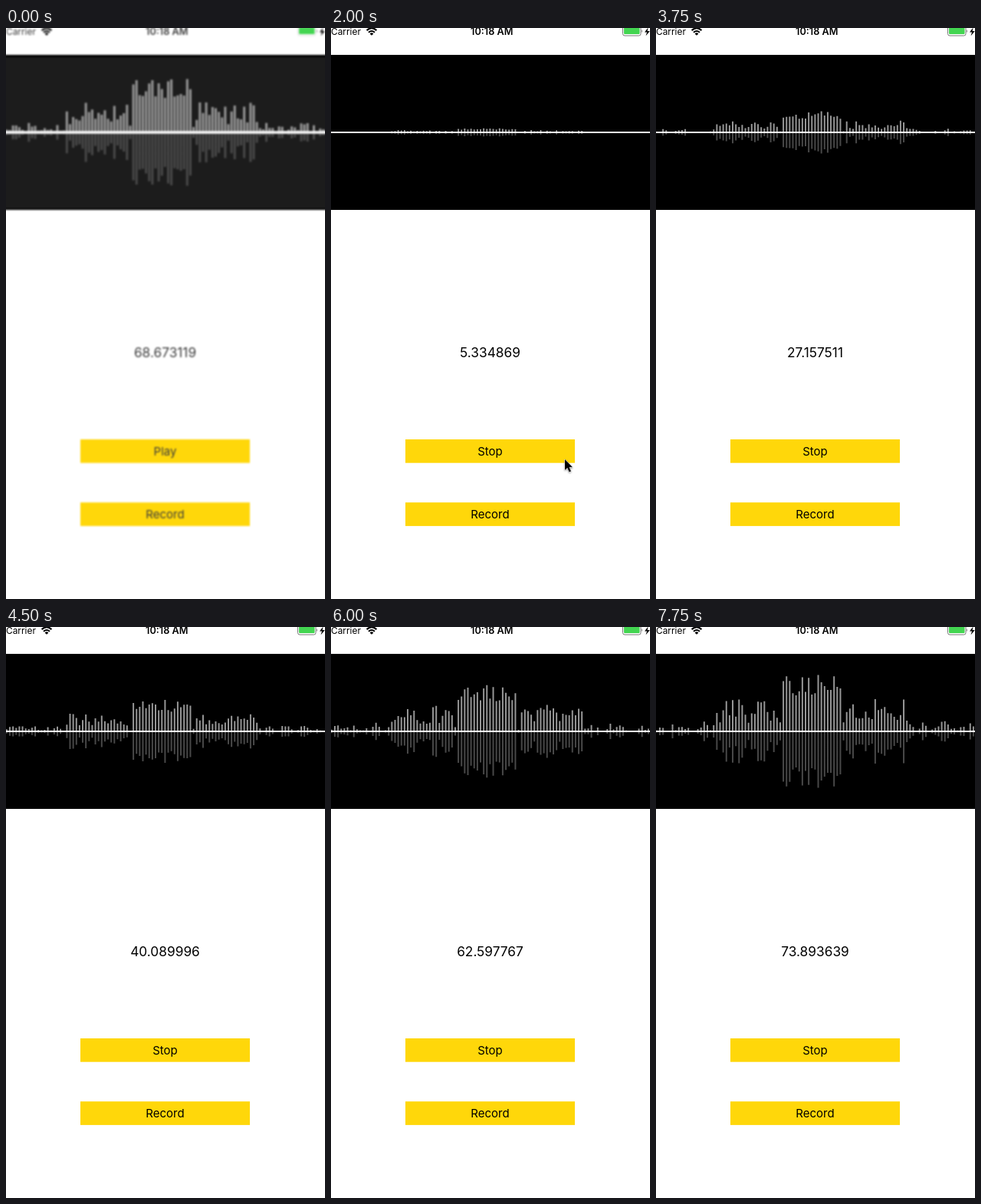
An HTML page for the animation above (8 s loop, 416x744 px).

```html
<!DOCTYPE html>
<html lang="en">
<head>
<meta charset="utf-8">
<title>Audio level recorder</title>
<style>
  html, body { margin: 0; width: 100%; height: 100%; overflow: hidden; background: #fff; }
  svg { display: block; width: 100vw; height: 100vh; }
  text { font-family: Inter, "Liberation Sans", sans-serif; fill: #000; }
  .mid { text-anchor: middle; }
  .button { fill: #ffd70a; }
  .caption { font-size: 15px; }
  .bars { fill: none; stroke-width: 2; }
  .soft { filter: blur(1px); }
  .soft text { fill: #3c3c3c; }
  .soft .screen { fill: #1c1c1c; }
  .soft .bars { stroke-width: 3; }
  .soft .axis { stroke-width: 3.4; }
  .soft .case { stroke: #ddd; }
</style>
</head>
<body>
<svg viewBox="0 0 416 744" preserveAspectRatio="none">
  <g id="app">
    <text x="0" y="9.2" font-size="11.9">Carrier</text>
    <g fill="none" stroke="#000" stroke-width="2.1">
      <path d="M46.6 3.1Q53 -2.7 59.4 3.1"/>
      <path d="M49 5.8Q53 2.2 57 5.8"/>
      <path d="M50.6 7.4Q53 5.2 55.4 7.4L53 9.8Z" fill="#000" stroke="none"/>
    </g>
    <text class="mid" x="209.8" y="9.2" font-size="12.7" font-weight="600">10:18 AM</text>
    <rect class="case" x="380.5" y="-2.5" width="23.5" height="12.5" rx="2.5" fill="none" stroke="#777"/>
    <rect x="382" y="-1" width="20.5" height="9" rx="1" fill="#43d551"/>
    <path d="M405.2 2.2q1.8 1.7 0 3.8z" fill="#777"/>
    <path d="M413.5 -.5L409 5.6H412L410.6 10.3L415.8 3.9H412.6Z"/>

    <rect x="-10" y="35" width="436" height="202"/>
    <rect class="screen" x="-10" y="38" width="436" height="197"/>
    <path class="bars" id="upper" stroke="#969696"/>
    <path class="bars" id="lower" stroke="#484848"/>
    <path class="axis" d="M-10 136H426" stroke="#fff" stroke-width="2"/>

    <text class="mid" id="level" x="207.5" y="429" font-size="17.3"></text>
    <rect class="button" x="97" y="536" width="221" height="30.7"/>
    <text class="mid caption" id="toggle" x="207.5" y="557"></text>
    <rect class="button" x="97" y="618.2" width="221" height="30.7"/>
    <text class="mid caption" x="207.5" y="639.2">Record</text>
  </g>
  <path id="cursor" d="M0 0V14L3.2 11L5.6 16.6L8 15.6L5.6 10.3H10Z" stroke="#fff" stroke-width="1"
    style="paint-order:stroke;filter:drop-shadow(0 1px 1px #0006)"/>
</svg>
<script>
const STEP = 250, LOOP = 8000;
const PLAY_STEP = 5, CURSOR_IN = 3, CURSOR_REST = 6, CURSOR_OUT = 9;
const BAR_COUNT = 101, PITCH = 4.13, AXIS = 136, CENTER = 49;
const IDLE_LEVEL = 68.673119;

// Key meter readings as [step, level]; linear in between
const keys = [
  [4, 0], [8, 5.334869], [12, 14.225025], [18, 40.089996],
  [24, 62.597767], [26, 75.184362], [28, 60.911972], [31, 73.893639]
];

const el = id => document.getElementById(id);
const mix = (a, b, p) => a + (b - a) * p;

function random(a, b) {
  const v = Math.sin(a * 12.9898 + b * 78.233 + 4.1) * 43758.5453;
  return v - Math.floor(v);
}

function levelAt(step) {
  if (step < PLAY_STEP) return IDLE_LEVEL;
  const next = keys.findIndex(([s]) => s >= step);
  const [s0, v0] = keys[next - 1], [s1, v1] = keys[next];
  return mix(v0, v1, (step - s0) / (s1 - s0));
}

// Tall centre, medium shoulders, low tails
function barHeight(i, seed, level) {
  const r = random(i, seed), distance = Math.abs(i - CENTER);
  if (distance < 10) return level * mix(.62, 1.02, r);
  if (distance > 10 && distance <= 30) return level * mix(.15, .58, r);
  return level * mix(.01, .18, r ** 1.5);
}

function drawCursor(step) {
  const visible = step >= CURSOR_IN && step < CURSOR_OUT;
  const p = Math.min(1, (step - CURSOR_IN) / (CURSOR_REST - CURSOR_IN));
  const eased = 1 - (1 - p) ** 2;
  el("cursor").setAttribute("visibility", visible ? "visible" : "hidden");
  el("cursor").setAttribute("transform", `translate(${mix(322, 305, eased)} ${mix(641, 562, eased)})`);
}

function draw(step) {
  const playing = step >= PLAY_STEP, level = levelAt(step);
  let up = "", down = "";
  for (let i = 0; i < BAR_COUNT; i++) {
    const x = (.9 + PITCH * i).toFixed(2);
    const h = barHeight(i, playing ? step : 0, level).toFixed(1);
    up += `M${x} ${AXIS}v-${h}`;
    down += `M${x} ${AXIS}v${h}`;
  }
  el("upper").setAttribute("d", up);
  el("lower").setAttribute("d", down);
  el("level").textContent = level.toFixed(6);
  el("toggle").textContent = playing ? "Stop" : "Play";
  el("app").classList.toggle("soft", step === 0);
  drawCursor(step);
}

let shown = -1;
function tick() {
  const step = Math.floor(performance.now() % LOOP / STEP);
  if (step !== shown) draw(shown = step);
  requestAnimationFrame(tick);
}
tick();
</script>
</body>
</html>
```
